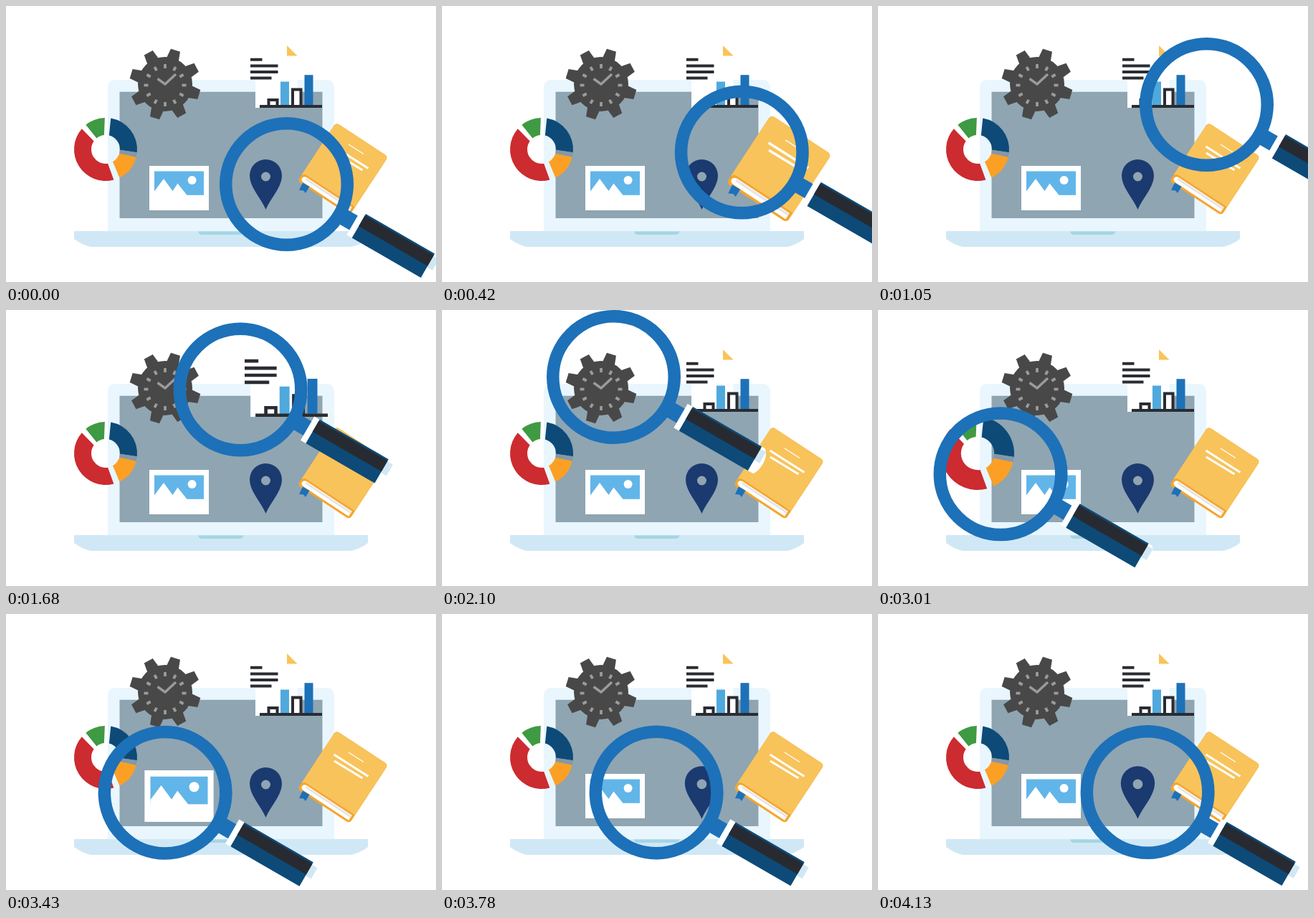
These frames come from a looping animation (600 px wide and 385 px high, 4.2 s). An HTML page:

```html
<!DOCTYPE html>
<html lang="en">
<head>
<meta charset="utf-8">
<title>Search</title>
<style>
html, body { margin: 0; width: 100%; height: 100%; overflow: hidden; background: #fff; }
svg { display: block; width: 600px; height: 385px; }
</style>
</head>
<body>
<svg viewBox="0 0 600 385" xmlns="http://www.w3.org/2000/svg">
  <g id="laptop">
    <rect x="142" y="103" width="316" height="222" rx="10" fill="#e9f6fe"/>
    <rect x="158.5" y="119.7" width="283" height="176.3" fill="#8fa5b2"/>
    <path d="M95 314H505V325Q493 334 481 336H119Q107 334 95 325Z" fill="#d0e8f6"/>
    <path d="M268 314.5H331.500Q330 319 326 319H273Q269 319 268 314.500Z" fill="#a4d5e6"/>
  </g>

  <g id="pie"></g>

  <g id="gear">
    <g id="teeth" fill="#484848"></g>
    <circle cx="222" cy="109" r="38" fill="#484848"/>
    <g id="ticks" stroke="#9b9b9b" stroke-width="3.8"></g>
    <path d="M211.500 101.500L222 109L237 95" fill="none" stroke="#9b9b9b" stroke-width="3.5"/>
  </g>

  <g id="chart">
    <path d="M348 55H392L406.500 69.500V142H348Z" fill="#fff"/>
    <path d="M392 55V69.500H406.500Z" fill="#f9c35a"/>
    <path d="M341 74.800H357.500M341 83.500H379.500M341 92H379.500M341 100.500H370.500" stroke="#292c32" stroke-width="4"/>
    <rect x="383" y="105.500" width="12" height="33" fill="#4fa9dd"/>
    <rect x="416.500" y="96.200" width="12" height="42" fill="#1d71b8"/>
    <path d="M366.500 139V131H378.500V139M400 139V116.500H411.500V139" fill="#fff" stroke="#292c32" stroke-width="4"/>
    <path d="M354 140H441" stroke="#292c32" stroke-width="4"/>
  </g>

  <g id="photo">
    <rect x="200" y="223" width="83" height="62" fill="#fff"/>
    <rect x="207" y="230.500" width="69" height="33.300" fill="#62b5e8"/>
    <circle cx="259.600" cy="243" r="6" fill="#fff"/>
    <path d="M207 258.500L220 241L232.500 258L239.500 247.500L253 264.500H207Z" fill="#fff"/>
  </g>

  <path id="pin" fill="#1a3a70" fill-rule="evenodd"
    d="M362.500 284C356 268 340 253 340 236.500A22.500 22.500 0 0 1 385 236.500C385 253 369 268 362.500 284ZM356 238a6.500 6.500 0 1 0 13 0a6.500 6.500 0 1 0 -13 0Z"/>

  <g id="book">
    <g transform="translate(460.500 162.500) rotate(33.300)">
      <rect width="87" height="98" rx="5" fill="#f5a52f"/>
      <path d="M8 86.500H83.500V95H8Q3 94.500 3 90.700Q3 87 8 86.500Z" fill="#fff"/>
      <path d="M8 90.500H83.500V87.500H8Z" fill="#e6e6e6"/>
      <path d="M5 0H82Q87 0 87 5V84H6Q2 84 0 88V5Q0 0 5 0Z" fill="#f8c35b"/>
    </g>
    <path d="M478 193L499 206.500" stroke="#fff" stroke-width="1.300"/>
    <path d="M457.500 196L505.500 226.500M458 205L497.500 229" stroke="#fff" stroke-width="3"/>
    <path d="M414 246.500L423.500 252L418 261L415 257.500L409 257Z" fill="#1d71b8"/>
  </g>

  <g id="glass">
    <g transform="rotate(30)">
      <path d="M226 -19.300H233Q241 -12 241 0Q241 13 236 19.300H226Z" fill="#fff"/>
      <rect x="227" y="-15.700" width="9.500" height="18" fill="#d0e8f6"/>
      <rect x="86" y="-11.500" width="24" height="23" fill="#1d71b8"/>
      <rect x="108" y="-19.300" width="9" height="38.600" fill="#fff"/>
      <rect x="116.500" y="-19.300" width="111" height="38.600" fill="#0d4a78"/>
      <rect x="116.500" y="-16.700" width="111" height="17.200" fill="#272b31"/>
    </g>
    <circle r="84.750" fill="none" stroke="#1d71b8" stroke-width="17.500"/>
  </g>
</svg>
<script>
const LOOP = 4200, STEP = 70, LEG = LOOP / 4, RAMP = 210, GROW = 0.16;
const $ = id => document.getElementById(id);

// Clockwise from twelve o'clock
const polar = (cx, cy, r, deg) => {
  const a = deg * Math.PI / 180;
  return `${(cx + r * Math.sin(a)).toFixed(2)} ${(cy - r * Math.cos(a)).toFixed(2)}`;
};

// Colour, outer start and end, inner start and end
const slices = [
  ["#cc2b30", 165, 311, 171, 305],
  ["#3f9a44", 321, 358.5, 321, 354],
  ["#0d4a78", 9.5, 95.5, 14, 92],
  ["#8398a9", 95.5, 104, 92, 107],
  ["#fba025", 104, 154, 107, 150]
];
$("pie").innerHTML = slices.map(([fill, a, b, c, d]) => {
  const at = (r, deg) => polar(139, 200, r, deg);
  const big = b - a > 180 ? 1 : 0;
  return `<path fill="${fill}" d="M${at(44, a)}A44 44 0 ${big} 1 ${at(44, b)}L${at(20, d)}A20 20 0 ${big} 0 ${at(20, c)}Z"/>`;
}).join("");

const spin = (count, first, make) =>
  Array.from({ length: count }, (_, i) => make(first + i * 360 / count)).join("");
$("teeth").innerHTML = spin(8, 17, a =>
  `<path transform="translate(222 109) rotate(${a})" d="M-9 -34L-6.800 -49.500H6.800L9 -34Z"/>`);
$("ticks").innerHTML = spin(12, 0, a =>
  `<path transform="translate(222 110.500) rotate(${a})" d="M0 -23.500V-29.500"/>`);

const stops = [[391.5, 248.5], [458.5, 137.5], [239.5, 93.5], [160.5, 249.5]];

// Part, centre, start and end of its swell
const pulses = [
  ["book", 469.5, 229, 210, 700],
  ["chart", 391, 98, 1330, 1890],
  ["gear", 222, 109, 2100, 2660],
  ["pie", 139, 200, 2660, 3220],
  ["photo", 241.5, 254, 3220, 3710],
  ["pin", 362.5, 249, 3710, 4200]
].map(([id, ...rest]) => [$(id), ...rest]);
const glass = $("glass");

function draw(time) {
  const t = Math.floor(time % LOOP / STEP) * STEP;
  const leg = Math.floor(t / LEG), k = t / LEG - leg;
  const from = stops[leg], to = stops[(leg + 1) % 4];
  const [x, y] = from.map((v, i) => v + (to[i] - v) * k);
  glass.setAttribute("transform", `translate(${x} ${y})`);

  for (const [part, cx, cy, start, end] of pulses) {
    const rise = Math.max(0, Math.min(1, (t - start) / RAMP, (end - t) / RAMP));
    const s = 1 + GROW * rise;
    part.setAttribute("transform", `translate(${cx} ${cy}) scale(${s}) translate(${-cx} ${-cy})`);
  }
}

const begin = performance.now();
function tick() {
  draw(performance.now() - begin);
  requestAnimationFrame(tick);
}
tick();
</script>
</body>
</html>
```
